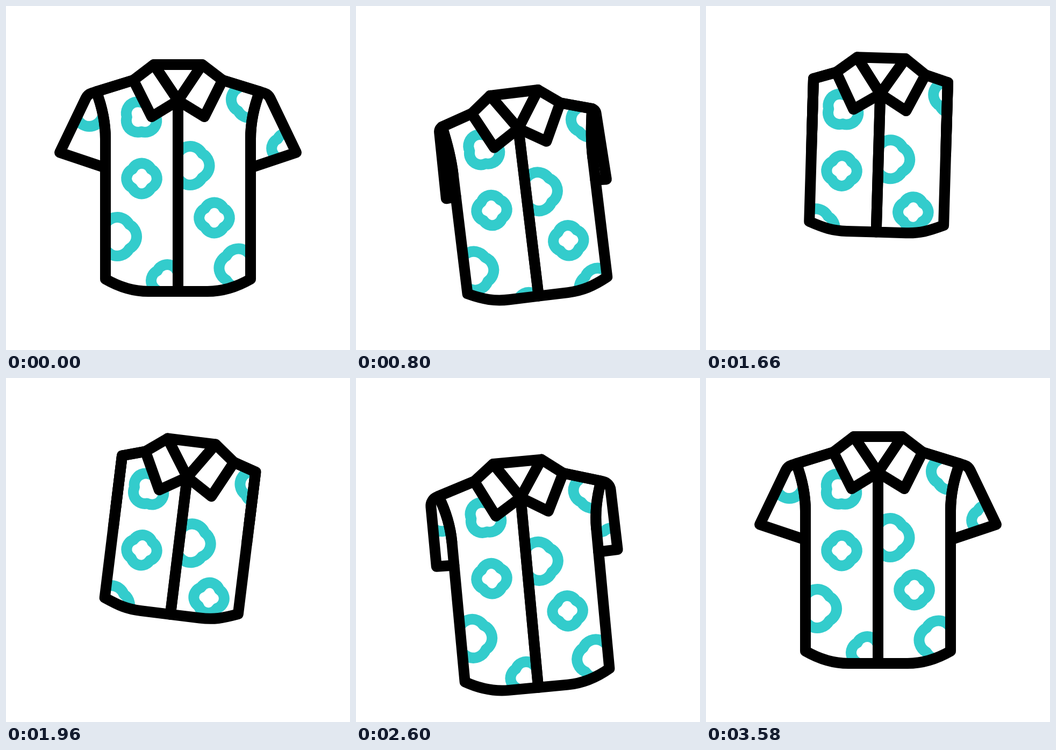
Write an HTML page with a canvas that moves like this. It is 640 px wide and 640 px high and loops after 3.6 s.

```html
<!DOCTYPE html>
<html lang="en">
<head>
<meta charset="utf-8">
<title>Folding shirt</title>
<style>
  html, body { margin: 0; width: 100%; height: 100%; overflow: hidden; background: #fff; }
  canvas { display: block; width: 640px; height: 640px; }
</style>
</head>
<body>
<canvas id="stage" width="640" height="640"></canvas>
<script>
const ctx = document.getElementById('stage').getContext('2d');
const LOOP = 3600;
const MID = 320;
const PIVOT = { x: 252.3, y: 321 };
const TEAL = '#33cccc';

// Eased progress from 0 to 1 between two times.
function ease(t, from, to) {
  const u = Math.min(1, Math.max(0, (t - from) / (to - from)));
  return (1 - Math.cos(Math.PI * u)) / 2;
}

const lift = t => 59 * ease(t, 0, 800) - 75 * ease(t, 800, 1750)
  + 73 * ease(t, 1750, 2450) - 57 * ease(t, 2450, 3250);
const tilt = t => -9 * ease(t, 0, 1180) + 16 * ease(t, 1180, 1970)
  - 12.9 * ease(t, 1970, 2700) + 5.9 * ease(t, 2700, 3500);
const hemFold = t => ease(t, 510, 1160) - ease(t, 1940, 2620);
const sleeveFold = t => ease(t, 0, 1220) - ease(t, 1980, 3280);

const mix = (a, b, u) => a + (b - a) * u;
const shoulderY = offset => 138 + 0.31 * (offset - 83);

function clipTo(path, draw) {
  ctx.save();
  ctx.clip(path);
  draw();
  ctx.restore();
}

// Ring of four lobes: each has radius r and sits d away from the centre.
function flower(x, y, d, r, turn = 0) {
  const diag = (d + Math.sqrt(2 * r * r - d * d)) / 2;
  const half = Math.acos((diag - d) / r);
  ctx.beginPath();
  for (let i = 0; i < 4; i++) {
    const dir = turn + i * Math.PI / 2;
    ctx.arc(x + d * Math.cos(dir), y + d * Math.sin(dir), r, dir - half, dir + half);
  }
  ctx.closePath();
  ctx.strokeStyle = TEAL;
  ctx.stroke();
}
const small = (x, y) => flower(x, y, 9, 19.3);
const big = (x, y) => flower(x, y, 10.5, 25.5);

function ink(path) {
  ctx.strokeStyle = '#000';
  ctx.stroke(path);
}

function fillWhite(path) {
  ctx.fillStyle = '#fff';
  ctx.fill(path);
}

// Traces a seam from the shoulder down to the side of the body.
function seam(path, side, fold) {
  const top = mix(152, 125, fold), waist = mix(135, 125, fold);
  path.lineTo(MID + side * top, shoulderY(top));
  path.bezierCurveTo(MID + side * mix(143, 125, fold), 183,
    MID + side * waist, 212, MID + side * waist, 247);
}

function panel(side, fold) {
  const waist = mix(135, 125, fold);
  const corner = mix(508, 417, fold), hem = mix(531, 433, fold);
  const path = new Path2D();
  path.moveTo(MID, 176);
  path.lineTo(MID + side * 83, 138);
  seam(path, side, fold);
  path.lineTo(MID + side * waist, corner);
  path.bezierCurveTo(MID + side * (waist - 28), mix(corner, hem, 0.7),
    MID + side * 82, hem, MID + side * 55, hem);
  path.lineTo(MID, hem);
  path.closePath();
  return path;
}

function sleeve(side, fold, s) {
  const cuff = mix(220, 125, s) + side * 6 * s * (1 - s);
  const cuffX = MID + side * cuff;
  const cuffY = 167 - 2 * s + Math.sqrt(124 ** 2 - (cuff - 155) ** 2);
  const tip = 168 - 43 * Math.pow(fold, 0.8);
  const endX = MID + side * mix(135, 125, fold);
  const trace = path => {
    path.arcTo(MID + side * tip, shoulderY(tip), cuffX, cuffY, Math.max(0, 18 * (1 - fold)));
    path.lineTo(cuffX, cuffY);
    path.lineTo(endX, 301 - 15 * Math.sqrt(s));
  };

  const outline = new Path2D();
  outline.moveTo(MID + side * 83, 138);
  trace(outline);

  const edge = new Path2D();
  seam(edge, side, fold);

  const cloth = new Path2D();
  const top = mix(152, 125, fold);
  cloth.moveTo(MID + side * top, shoulderY(top));
  trace(cloth);
  cloth.lineTo(endX, 247);

  // The print swings with the sleeve around the shoulder.
  const swing = Math.asin(65 / 125) - Math.asin((cuff - 155) / 125);
  clipTo(cloth, () => {
    ctx.translate(MID + side * 155, 165);
    ctx.rotate(side * swing);
    ctx.translate(-MID - side * 155, -165);
    if (side < 0) big(155, 188);
    else small(522.5, 265);
  });
  return [outline, edge];
}

function collar(side) {
  const path = new Path2D();
  const points = [[45, 109], [83, 138], [49, 206], [0, 176]];
  for (const [x, y] of points) path.lineTo(MID + side * x, y);
  path.closePath();
  fillWhite(path);
  ink(path);
}

function neckline() {
  const path = new Path2D();
  path.moveTo(275, 109);
  path.lineTo(365, 109);
  path.lineTo(MID, 176);
  path.closePath();
  fillWhite(path);
  ink(path);
}

function draw(t) {
  const fold = hemFold(t), s = Math.max(0, sleeveFold(t));
  ctx.setTransform(1, 0, 0, 1, 0, 0);
  ctx.fillStyle = '#fff';
  ctx.fillRect(0, 0, 640, 640);
  ctx.translate(PIVOT.x, PIVOT.y + lift(t));
  ctx.rotate(tilt(t) * Math.PI / 180);
  ctx.translate(-PIVOT.x, -PIVOT.y);
  ctx.lineWidth = 20;
  ctx.lineJoin = ctx.lineCap = 'round';

  const sleeves = [...sleeve(-1, fold, s), ...sleeve(1, fold, s)];
  const left = panel(-1, fold), right = panel(1, fold);
  fillWhite(left);
  fillWhite(right);

  clipTo(left, () => {
    flower(252, 206.5, 9.5, 21.5, Math.PI / 4);
    small(252.5, 321);
    big(207, 429);
    flower(300, 511, 9.5, 20.5);
  });
  clipTo(right, () => {
    flower(453, 174, 10, 24);
    big(342.5, 297);
    small(387.5, 394);
    big(432.5, 487.5);
  });

  sleeves.forEach(ink);
  ink(left);
  ink(right);
  neckline();
  collar(-1);
  collar(1);
}

const start = performance.now();
function frame() {
  draw((performance.now() - start) % LOOP);
  requestAnimationFrame(frame);
}
draw(0);
requestAnimationFrame(frame);
</script>
</body>
</html>
```
